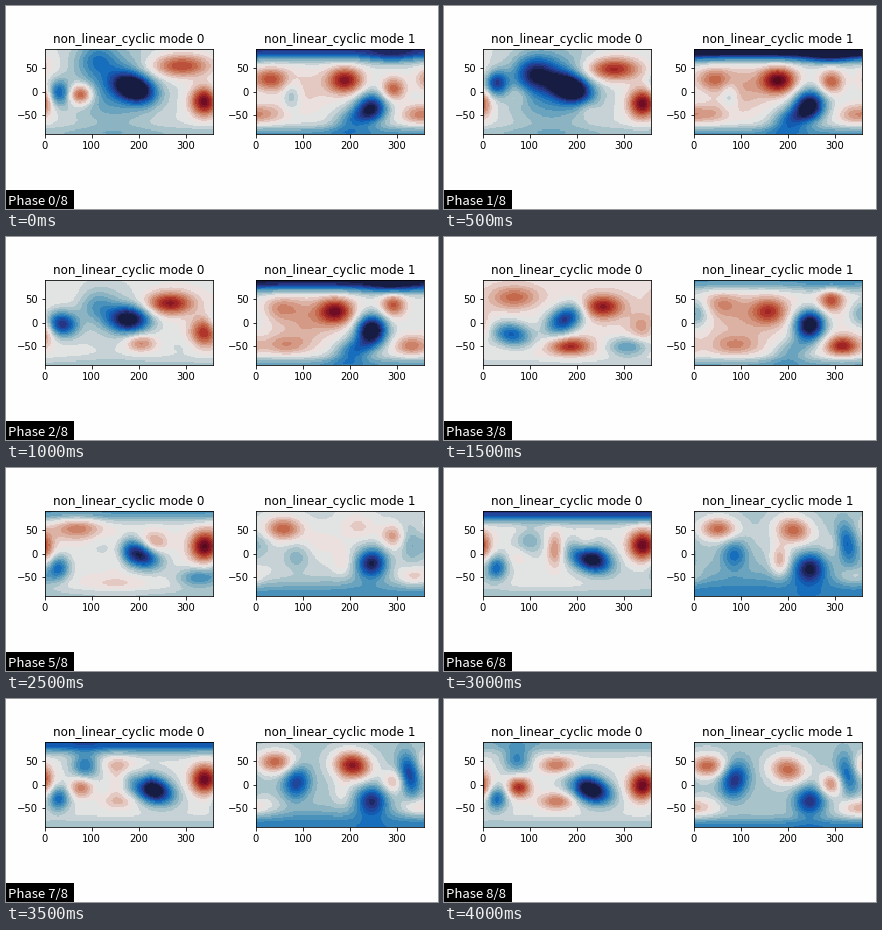
A matplotlib script for the animation above (4500 ms loop, 432 px wide and 203 px high).

```python
import numpy as np
import matplotlib.pyplot as plt
from matplotlib.animation import FuncAnimation
from matplotlib.colors import LinearSegmentedColormap
from matplotlib.patches import Rectangle

W, H, DPI = 432, 203, 72
PHASES, STEP_MS = 9, 500
SPREAD = 1.15
ZONAL = 1e4  # width of a blob that circles the globe

BALANCE = ["#171c42", "#293a8f", "#0b66bd", "#4590b9", "#8eb5c2", "#d2d8db",
           "#e6d2cc", "#d59d89", "#c46548", "#ac2b24", "#780e28", "#3c0911"]
stops = [(i / 11, c) for i, c in enumerate(BALANCE)]
stops.insert(6, (0.5, "#f0eceb"))
cmap = LinearSegmentedColormap.from_list("balance", stops, N=26)

lon, lat = np.meshgrid(np.arange(0, 360, 2.5), np.arange(-90, 90.1, 2.5))


def blob(amp, x, y, sx, sy, tilt=0):
    """Gaussian bump, cyclic in longitude; tilt in degrees."""
    dx = (lon - x + 180) % 360 - 180
    dy = lat - y
    a = np.radians(tilt)
    u = (dx * np.cos(a) + dy * np.sin(a)) / (sx * SPREAD)
    v = (dy * np.cos(a) - dx * np.sin(a)) / (sy * SPREAD)
    return amp * np.exp(-u ** 2 - v ** 2)


def bump(k, peak, width):
    return np.exp(-((k - peak) / width) ** 2)


def ease(k, start, end):
    s = np.clip((k - start) / (end - start), 0, 1)
    return s * s * (3 - 2 * s)


def swing(k, peak, period):
    return np.cos(2 * np.pi * (k - peak) / period)


def mode_0(k):
    f = -.06 + .12 * bump(k, 3.5, 1.5)
    # polar bands
    f = f + blob(-.75 * bump(k, 6.3, 1.6), 180, 88, ZONAL, 17)
    f += blob(-.15, 180, -90, ZONAL, 14)
    # central low drifting west, then jumping east
    x = 190 - 15 * ease(k, 0, 3) + 55 * ease(k, 4, 6)
    f += blob(-1.1 + .3 * bump(k, 3.5, 1.5), x, 7 - 18 * ease(k, 4, 6),
              38, 24, -20 + 50 * bump(k, 3, 1))
    f += blob(-.5 * bump(k, .6, 1.2), 145, 10, 75, 75, -20)
    # high on the eastern edge
    f += blob(.9 - .65 * bump(k, 3, 1), 341, -4 - 22 * swing(k, 1, 9.5),
              26, 27)
    # northern high sinking westward, then one in the north-west
    f += blob(.75 * bump(k, 1.8, 4), 290 - 12 * k, 55 - 7 * k,
              55 - 6 * k, 21)
    f += blob(.8 * bump(k, 4, 1.2), 68, 54, 44, 21)
    # northern lows
    f += blob(-.6 * bump(k, 1, 1.2), 110, 70 - 32 * ease(k, 0, 1), 36, 30)
    f += blob(-.5 * bump(k, 7.3, 1.6), 176 - 13 * k, 13 * k - 51, 26, 25)
    # western low and the spot beside it
    f += blob(-.55 - .25 * bump(k, 2, 1.2), 28 + 32 * bump(k, 3, .8),
              -30 + 48 * bump(k, 1, 1.3), 20 + 18 * bump(k, 3, 1.2), 23, -10)
    f += blob(.7 * (bump(k, 0, .8) + bump(k, 8, 1.5)), 76, -6, 22, 19)
    # southern high and south-eastern low
    f += blob(.6 * bump(k, 3, 1.6), 240 - 18 * k, -30 - 7 * k, 10 + 9 * k, 16)
    f += blob(-.8 * bump(k, 4, 1.3), 280 + 10 * k, -52, 40, 19)
    # highs west of the central low
    f += blob(.4 * bump(k, 6, 1), 153, 8, 15, 30)
    for y in (42, -36):
        f += blob(.45 * bump(k, 8, 1.2), 157, y, 33, 16)
    return f


def mode_1(k):
    f = -.06 + .1 * bump(k, 3.5, 1.5) - .12 * ease(k, 4, 6)
    # polar bands
    polar = bump(k, 1.2, 1.8)
    f = f + blob(-1.15 * polar, 180, 90, ZONAL, 19)
    f += blob(-.35 * polar, 290, 76, 45, 14)
    f += blob(-.35, 180, -92, ZONAL, 15 + 30 * bump(k, 6, 1.2))
    # eastern low with its tail
    f += blob(-.65 - .5 * bump(k, 2.8, 2.3), 247,
              -36 + 32 * bump(k, 3.3, 2), 28, 27, 15)
    f += blob(-.6 * bump(k, 1.3, 2.3), 212, -58, 40, 23, 20)
    # central high, before and after
    f += blob(.9 * bump(k, 1, 2.8), 190 - 10 * k, 24, 32, 24)
    f += blob(.9 * bump(k, 7, 1.6), 248 - 6 * k, 104 - 9 * k, 34, 25, -10)
    f += blob(.3 * bump(k, 1.5, 2), 100, 5, 55, 45)
    f += blob(.42 * bump(k, 6, 1), 183, -15, 18, 30)
    # north-western high
    f += blob(.62 - .4 * bump(k, 2.5, 2), 28 + 32 * np.sin(np.pi * k / 8),
              40 - 14 * swing(k, .5, 10), 34, 21)
    # eastern and southern highs
    f += blob(.52 - .42 * bump(k, 6, 1), 293, 25 + 25 * swing(k, 3.5, 9),
              22, 21)
    hot = bump(k, 3.2, 1.2)
    f += blob(.22 + .45 * hot, 340 - 24 * hot, -50, 29, 18)
    f += blob(.28 * (1 - bump(k, 5.5, 1.5)), 15 + 70 * bump(k, 3, 1.5),
              -48, 42, 19)
    # lows in the west and far east
    f += blob(-.52 * bump(k, 3.7, 1.2), 3, 20, 25, 26)
    f += blob(-.35 * bump(k, .5, 1), 75, -8, 17, 28)
    f += blob(-.66 * bump(k, 8, 2.8), 86, -38 + 6 * k, 25, 6 + 3.5 * k, -15)
    f += blob(-.6 * bump(k, 7, 1.9), 327, 21, 19, 40, 10)
    return f


MODES = (mode_0, mode_1)
fig = plt.figure(figsize=(W / DPI, H / DPI), dpi=DPI, facecolor="#fefefe")


def panel(mode, left):
    ax = fig.add_axes([left / W, (H - 127.8) / H, 168 / W, 84.6 / H])
    im = ax.imshow(MODES[mode](0), cmap=cmap, vmin=-1, vmax=1,
                   origin="lower", extent=(0, 357.5, -90, 90),
                   aspect="auto", interpolation="nearest")
    ax.set_xticks([0, 100, 200, 300])
    ax.set_yticks([-50, 0, 50])
    ax.tick_params(labelsize=10)
    ax.set_title(f"non_linear_cyclic mode {mode}", fontsize=12)
    return im


images = [panel(0, 38.8), panel(1, 249.9)]

fig.add_artist(Rectangle((0, 0), 68 / W, 19 / H, color="black", lw=0,
                         transform=fig.transFigure))
label = fig.text(1.5 / W, 4 / H, "", color="white", fontsize=13.2,
                 family="Noto Sans CJK JP", va="baseline")


def draw(phase):
    for im, field in zip(images, MODES):
        im.set_data(field(phase))
    label.set_text(f"Phase {phase}/{PHASES - 1}")
    return [*images, label]


anim = FuncAnimation(fig, draw, frames=PHASES, interval=STEP_MS, repeat=True,
                     repeat_delay=0)
plt.show()
```
